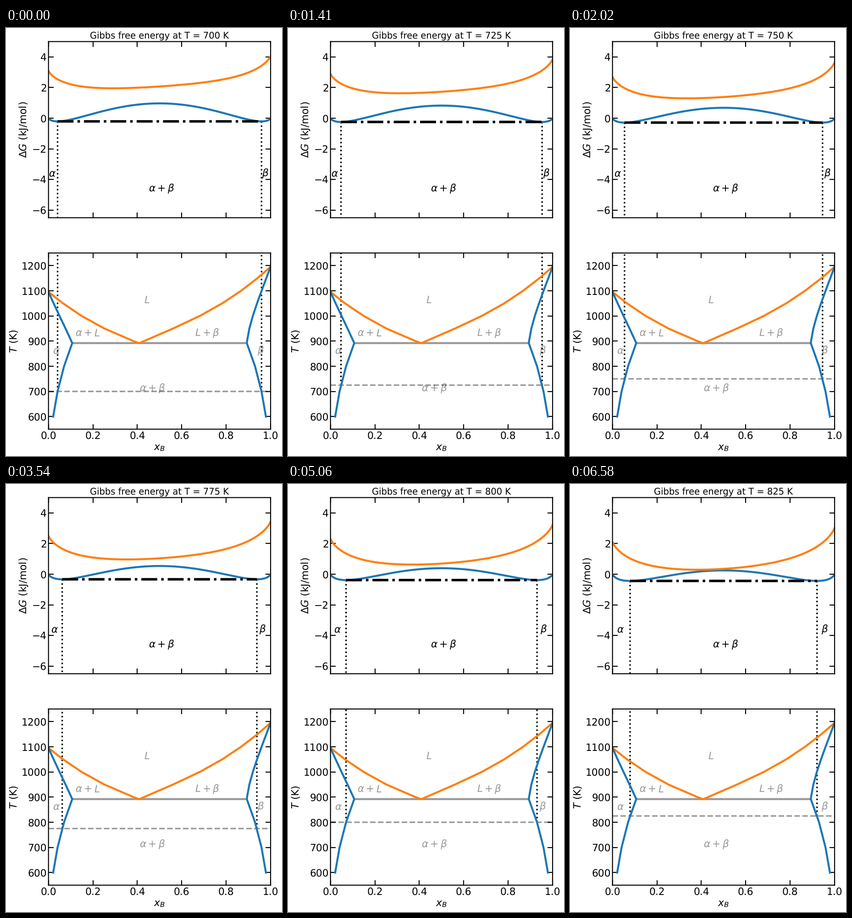
A matplotlib script for the animation above (8000 ms loop, 602 by 930 pixels).

```python
import numpy as np
import matplotlib.pyplot as plt
from matplotlib.animation import FuncAnimation

W, H, DPI = 602, 930, 80
LOOP, STEP = 8000, 40          # ms
HOLD, FIRST = 1520, 500        # ms each temperature stays on screen
PT = 78.125 / DPI              # size of a design point
BLUE, ORANGE = "#1f77b4", "#ff7f0e"
FAINT = dict(color="black", alpha=0.4)

plt.rcParams.update({
    "font.family": "DejaVu Sans",
    "mathtext.fontset": "dejavusans",
    "font.size": 20 * PT,
    "text.hinting": "none",
    "path.snap": False,
    "axes.titlesize": 18 * PT,
    "axes.titlepad": 6 * PT,
    "axes.labelpad": 4 * PT,
    "axes.linewidth": 2 * PT,
    "lines.linewidth": 4 * PT,
})

# Regular-solution model, kJ/mol and K
R = 8.314e-3
OMEGA_S, OMEGA_L = 20, 10.1
MELT_A, MELT_B, EUTECTIC = 1095, 1195, 892
x = np.linspace(0.001, 0.999, 500)
mixing = x * np.log(x) + (1 - x) * np.log(1 - x)


def melt_energies(T):
    return 0.00784 * (MELT_A - T), 0.0082 * (MELT_B - T)


def g_solid(T):
    return OMEGA_S * x * (1 - x) + R * T * mixing


def g_liquid(T):
    a, b = melt_energies(T)
    return (1 - x) * a + x * b + OMEGA_L * x * (1 - x) + R * T * mixing


def binodal(T):
    """Solubility limit of the alpha phase."""
    xs = 0.01
    for _ in range(200):
        xs = 1 / (1 + np.exp(OMEGA_S * (1 - 2 * xs) / (R * T)))
    return xs


def coexist(T, host, guest):
    """Guest fractions in solid and liquid at equal chemical potentials."""
    xs, xl = 0.05, 0.2
    for _ in range(300):
        d_guest = guest + OMEGA_L * (1 - xl) ** 2 - OMEGA_S * (1 - xs) ** 2
        d_host = OMEGA_S * xs ** 2 - OMEGA_L * xl ** 2 - host
        xs, xl = (xl * np.exp(d_guest / (R * T)),
                  1 - (1 - xs) * np.exp(d_host / (R * T)))
    return xs, xl


def boundaries(melt, swap):
    """Solidus and liquidus from the eutectic up to a pure melting point."""
    temps = [EUTECTIC, *range(900, melt, 50), melt]
    order = -1 if swap else 1
    xs, xl = np.transpose([coexist(T, *melt_energies(T)[::order]) for T in temps])
    return temps, xs, xl


fig = plt.figure(figsize=(W / DPI, H / DPI), dpi=DPI, facecolor="white")


def panel(top, ylim, yticks):
    left, width, height = 92.7, 484.4, 382.8
    ax = fig.add_axes([left / W, 1 - (top + height) / H, width / W, height / H])
    ax.set(xlim=(0, 1), ylim=ylim, yticks=yticks, xticks=np.arange(6) / 5)
    ax.tick_params(direction="in", top=True, right=True,
                   length=10 * PT, width=2 * PT, pad=3.5 * PT)
    return ax


energy = panel(29.5, (-6.5, 5), range(-6, 5, 2))
energy.tick_params(labelbottom=False)
energy.set_ylabel(r"$\Delta G$ (kJ/mol)")
phase = panel(488.9, (550, 1250), range(600, 1201, 100))
phase.set_xlabel("$x_B$")
phase.set_ylabel("$T$ (K)")


def dotted(ax):
    return ax.plot([], [], ":", color="black", lw=3 * PT)[0]


# Free-energy panel
drops = [dotted(energy) for _ in range(2)]
solid, = energy.plot([], [], color=BLUE)
liquid, = energy.plot([], [], color=ORANGE)
tie, = energy.plot([], [], "-.", color="black", lw=5 * PT)
alpha_label = energy.text(0, -3.8, r"$\alpha$")
beta_label = energy.text(0, -3.8, r"$\beta$")
energy.text(0.45, -4.8, r"$\alpha+\beta$")
title = energy.set_title("")

# Phase diagram
rises = [dotted(phase) for _ in range(2)]
isotherm = phase.axhline(700, ls="--", lw=3 * PT, **FAINT)
x_eut = binodal(EUTECTIC)
phase.plot([x_eut, 1 - x_eut], [EUTECTIC] * 2, **FAINT)

cool = [600, 700, 800]
limit = [binodal(T) for T in cool]
t_a, solidus_a, liquidus_a = boundaries(MELT_A, swap=False)
t_b, solidus_b, liquidus_b = boundaries(MELT_B, swap=True)
phase.plot(np.r_[liquidus_a[::-1], 1 - liquidus_b], np.r_[t_a[::-1], t_b],
           color=ORANGE)
phase.plot(np.r_[limit, solidus_a], np.r_[cool, t_a], color=BLUE)
phase.plot(1 - np.r_[limit, solidus_b], np.r_[cool, t_b], color=BLUE)

for px, py, label in [(0.43, 1050, "L"), (0.12, 920, r"\alpha+L"),
                      (0.66, 920, r"L+\beta"), (0.02, 850, r"\alpha"),
                      (0.94, 850, r"\beta"), (0.41, 700, r"\alpha+\beta")]:
    phase.text(px, py, f"${label}$", **FAINT)


def update(i):
    t = (i + 0.5) * STEP
    T = 700 + 25 * int((t - FIRST + HOLD) // HOLD)
    xa = binodal(T)
    ends = (xa, 1 - xa)
    curve = g_solid(T)
    g_tie = np.interp(xa, x, curve)

    solid.set_data(x, curve)
    liquid.set_data(x, g_liquid(T))
    tie.set_data(ends, (g_tie, g_tie))
    for xi, drop, rise in zip(ends, drops, rises):
        drop.set_data((xi, xi), (g_tie, -6.5))
        rise.set_data((xi, xi), (T, 1250))
    isotherm.set_ydata((T, T))
    alpha_label.set_x(xa / 2 - 0.02)
    beta_label.set_x(1 - xa / 2 - 0.02)
    title.set_text(f"Gibbs free energy at T = {T} K")
    return []


anim = FuncAnimation(fig, update, frames=LOOP // STEP, interval=STEP,
                     repeat=True, repeat_delay=0, blit=False)
plt.show()
```
